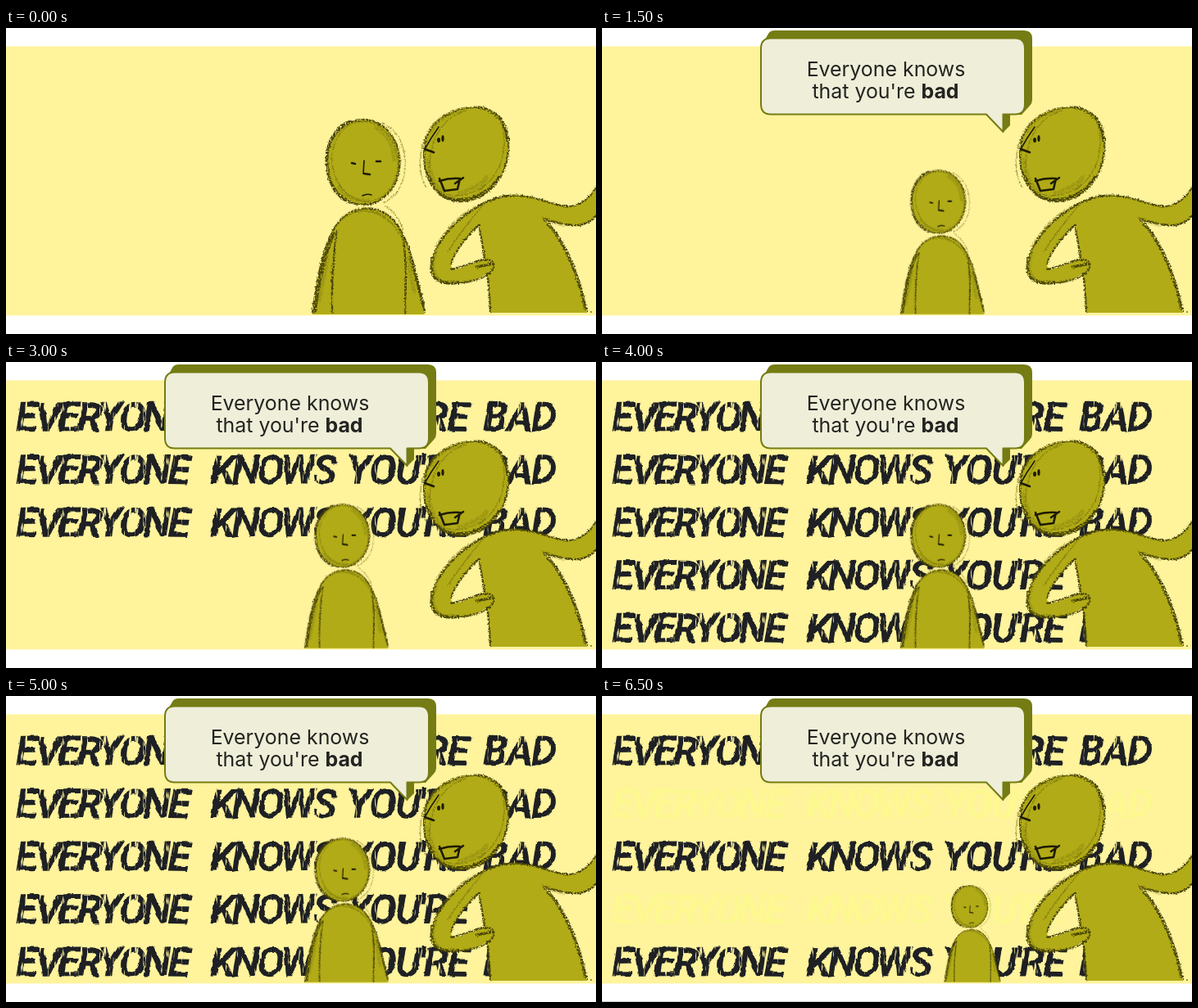
An HTML page for the animation above (7000 ms loop, 720 px wide and 374 px high).

```html
<!DOCTYPE html>
<html lang="en">
<head>
<meta charset="utf-8">
<title>Everyone knows</title>
<style>
  html, body { margin: 0; width: 100%; height: 100%; overflow: hidden; background: #fff; }
  svg { display: block; width: 100vw; height: 100vh; }

  .brush { font: italic 700 50px Roboto, sans-serif; letter-spacing: -4px; }
  .loose { letter-spacing: -2.3px; }
  .speech { font: 24.9px Inter, sans-serif; text-anchor: middle; fill: #232420; }
  .bold { font-weight: 700; }

  .skin { fill: #b1ab17; }
  .ink { fill: none; stroke: #454106; stroke-width: 2.4; stroke-linecap: round; stroke-linejoin: round; }
  .heavy { stroke-width: 3.8; }
  .soft { stroke: #6f6a0a; stroke-width: 1.6; opacity: .6; }
  .shade { stroke: #6f6a0a; stroke-width: 5; opacity: .3; }
  .face { stroke: #1d1b05; stroke-width: 2.6; }
  .thin { stroke-width: 1.6; }
  .dot { fill: #1d1b05; }

  /* One loop is fourteen half-second beats with hard cuts. */
  .cut { animation: 7s step-end infinite; }
  .bubble { animation-name: bubble; }
  .plain { animation-name: plain; }
  .stress { animation-name: stress; }
  .small { animation-name: shrink; }
  .edge { animation-name: edge; }
  .line { fill: #1e2024; }
  .l1 { animation-name: line1; }
  .l2 { animation-name: line2; }
  .l3 { animation-name: line3; }
  .l4 { animation-name: line4; }
  .l5 { animation-name: line5; }

  @keyframes bubble { 0% { opacity: 0 } 7.14%, 100% { opacity: 1 } }
  @keyframes plain { 0% { opacity: 1 } 14.28%, 100% { opacity: 0 } }
  @keyframes stress { 0% { opacity: 0 } 14.28%, 100% { opacity: 1 } }
  @keyframes shrink {
    0% { transform: none }
    21.42% { transform: translate(88px, 91px) scale(.74) }
    92.85%, 100% { transform: translate(232px, 176px) scale(.497) }
  }
  @keyframes edge { 0% { opacity: 0 } 92.85%, 100% { opacity: 1 } }
  @keyframes line1 { 0% { opacity: 0 } 28.57%, 100% { opacity: 1 } }
  @keyframes line2 {
    0% { opacity: 0; fill: #1e2024 }
    35.71% { opacity: 1; fill: #1e2024 }
    92.85%, 100% { opacity: 1; fill: #fdf890 }
  }
  @keyframes line3 { 0% { opacity: 0 } 42.85%, 100% { opacity: 1 } }
  @keyframes line4 {
    0% { opacity: 0; fill: #1e2024 }
    50% { opacity: 1; fill: #1e2024 }
    92.85%, 100% { opacity: 1; fill: #fdf890 }
  }
  @keyframes line5 { 0% { opacity: 0 } 57.14%, 100% { opacity: 1 } }
</style>
</head>
<body>
<svg viewBox="0 0 720 374" preserveAspectRatio="none">
  <defs>
    <filter id="dry" x="-2%" y="-20%" width="104%" height="140%" color-interpolation-filters="sRGB">
      <feTurbulence type="fractalNoise" baseFrequency=".08" numOctaves="3" seed="4" result="wobble"/>
      <feDisplacementMap in="SourceGraphic" in2="wobble" scale="4" xChannelSelector="R" yChannelSelector="G" result="rough"/>
      <feTurbulence type="fractalNoise" baseFrequency=".3 .05" numOctaves="2" seed="9"/>
      <feColorMatrix values="0 0 0 0 0  0 0 0 0 0  0 0 0 0 0  8 0 0 0 -1.9" result="streaks"/>
      <feComposite in="rough" in2="streaks" operator="in"/>
    </filter>
    <filter id="charcoal" x="-10%" y="-10%" width="120%" height="120%" color-interpolation-filters="sRGB">
      <feTurbulence type="fractalNoise" baseFrequency=".5" numOctaves="2" seed="3" result="grain"/>
      <feDisplacementMap in="SourceGraphic" in2="grain" scale="3.5" xChannelSelector="R" yChannelSelector="G" result="rough"/>
      <feColorMatrix in="grain" values="0 0 0 0 0  0 0 0 0 0  0 0 0 0 0  0 0 4 0 -1.15" result="holes"/>
      <feComposite in="rough" in2="holes" operator="in"/>
    </filter>

    <text id="chant" class="brush" rotate="-1 1 -1 1 -1 1 -1 1 0 1 -1 1 -1 1 0 -1 1 1 0 -1 1 0 -1 1 -1"><tspan x="12">EVERYONE </tspan><tspan x="249">KNOWS </tspan><tspan x="416" class="loose">YOU'RE </tspan><tspan x="582" class="loose">BAD</tspan></text>

    <path id="smallBody" d="M374 350C379 310 387 261 406 237C422 218 449 215 468 230C491 249 501 301 511 350Z"/>
    <path id="tallHead" d="M511 143C515 114 546 95 577 97C606 101 617 127 612 158C606 190 582 213 552 212C523 209 506 179 511 143Z"/>
    <path id="tallBody" d="M591 348C590 326 589 312 587 300C575 309 556 314 538 312C516 310 514 291 526 268C541 239 577 211 609 205C638 201 661 215 682 218C701 220 713 207 722 192V227C711 243 694 243 678 239C669 238 662 235 656 233C682 262 699 302 709 348ZM577 241C564 252 549 271 543 288C543 297 550 295 556 293C565 290 574 286 584 283C582 268 580 255 577 241Z"/>
  </defs>

  <rect y="22.4" width="720" height="329" fill="#fff39c"/>

  <g>
    <g class="cut line l1"><use href="#chant" y="84.5" filter="url(#dry)"/></g>
    <g class="cut line l2"><use href="#chant" y="149" filter="url(#dry)"/></g>
    <g class="cut line l3"><use href="#chant" y="213.5" filter="url(#dry)"/></g>
    <g class="cut line l4"><use href="#chant" y="278" filter="url(#dry)"/></g>
    <g class="cut line l5"><use href="#chant" y="342.5" filter="url(#dry)"/></g>
  </g>

  <g class="cut small">
    <use href="#smallBody" class="skin"/>
    <ellipse class="skin" cx="436" cy="164" rx="44.5" ry="52"/>
    <g filter="url(#charcoal)">
      <path class="ink" d="M374 348C379 310 387 261 406 237C422 218 449 215 468 230C491 249 501 301 511 347"/>
      <path class="ink heavy" d="M377 346C381 316 389 276 400 251M494 280L509 338"/>
      <path class="ink" d="M398 348C397 310 399 278 404 248M487 349C488 315 489 279 484 255"/>
      <path class="ink soft" d="M403 241C423 211 456 216 481 251M414 230C443 214 474 232 486 263M463 217C475 226 482 236 484 247"/>
      <path class="ink shade" d="M492 280C493 298 495 309 498 322M382 333L393 278"/>
      <ellipse class="ink" cx="436" cy="164" rx="44.5" ry="52"/>
      <path class="ink heavy" d="M421 114C398 122 389 147 392 171C394 191 404 206 419 213"/>
      <ellipse class="ink soft" cx="438" cy="163" rx="40" ry="49" transform="rotate(-8 438 163)"/>
      <path class="ink soft" d="M459 116C482 126 490 152 486 179C482 198 473 207 461 214" stroke-dasharray="3 2"/>
      <path class="ink shade" d="M452 122C469 132 474 149 474 161M407 195C415 207 427 211 441 211"/>
    </g>
    <path class="ink face" d="M422 165L426 166M452 163L457 163M437 178L444 179"/>
    <path class="ink face thin" d="M437 162L436 178M435 205Q440 202 446 204"/>
  </g>

  <g>
    <use href="#tallBody" class="skin" fill-rule="evenodd"/>
    <use href="#tallHead" class="skin"/>
    <g filter="url(#charcoal)">
      <path class="ink" d="M591 347C590 326 589 312 587 300M577 241C580 255 582 268 584 283M609 205C577 211 541 239 526 268C514 291 516 310 538 312C556 313 581 309 592 298C600 287 592 282 583 283C570 286 560 291 543 295M577 241C564 252 549 271 543 288"/>
      <path class="ink" d="M606 206C638 200 661 215 682 218C701 220 713 207 722 192M722 227C711 243 694 243 678 239C669 238 662 235 656 233C682 262 699 302 709 346"/>
      <path class="ink heavy" d="M521 281C514 306 530 314 551 311M662 240C686 266 700 308 707 343M575 292L594 288"/>
      <path class="ink soft" d="M574 218C553 228 535 247 524 268M584 214C571 231 551 252 540 273M654 230L668 247M714 204L720 196"/>
      <path class="ink shade" d="M524 275C519 288 519 300 528 307M659 234L680 241"/>
      <use href="#tallHead" class="ink"/>
      <path class="ink heavy" d="M516 181C522 202 537 211 555 210C577 209 593 196 602 182M578 97C600 101 611 117 612 137"/>
      <path class="ink soft" d="M512 194C499 169 505 128 531 109C556 91 588 94 603 113M517 184C515 143 526 112 561 101M605 117C613 148 605 179 577 199M519 191C537 213 568 206 586 190"/>
      <path class="ink shade" d="M518 126C527 112 541 103 556 101M515 161C517 180 523 193 535 203M553 202Q575 196 587 183"/>
    </g>
    <g class="ink face">
      <path class="thin" d="M528 121Q518 135 511 148"/>
      <path d="M511 148L522 152M529 184L535 199L551 197L554 184Q541 183 529 187M548 190L558 183"/>
    </g>
    <ellipse class="dot" cx="528" cy="137" rx="2" ry="3"/>
    <ellipse class="dot" cx="533" cy="135" rx="1.6" ry="4"/>
    <circle cx="714" cy="347" r="1" fill="#77720f"/>
  </g>

  <g class="cut bubble">
    <path fill="#747c13" d="M194 23L203 7Q205 3 211 3H515Q525 3 525 13V88Q525 92 522 95L512 106H498V119L489 128V105H205Z"/>
    <path fill="#efeed9" stroke="#747c13" stroke-width="2" stroke-linejoin="round" d="M206 12.5H504Q516 12.5 516 25V93Q516 105.5 504 105.5H489.5V127L469 105.5H206Q194 105.5 194 93V25Q194 12.5 206 12.5Z"/>
    <text class="speech" x="346.5" y="59">Everyone knows</text>
    <text class="speech cut plain" x="346" y="86">that you're bad</text>
    <text class="speech cut stress" x="346" y="86">that you're <tspan class="bold">bad</tspan></text>
  </g>

  <rect class="cut edge" y="373" width="720" height="1" fill="#cfcfcf"/>
</svg>
</body>
</html>
```
